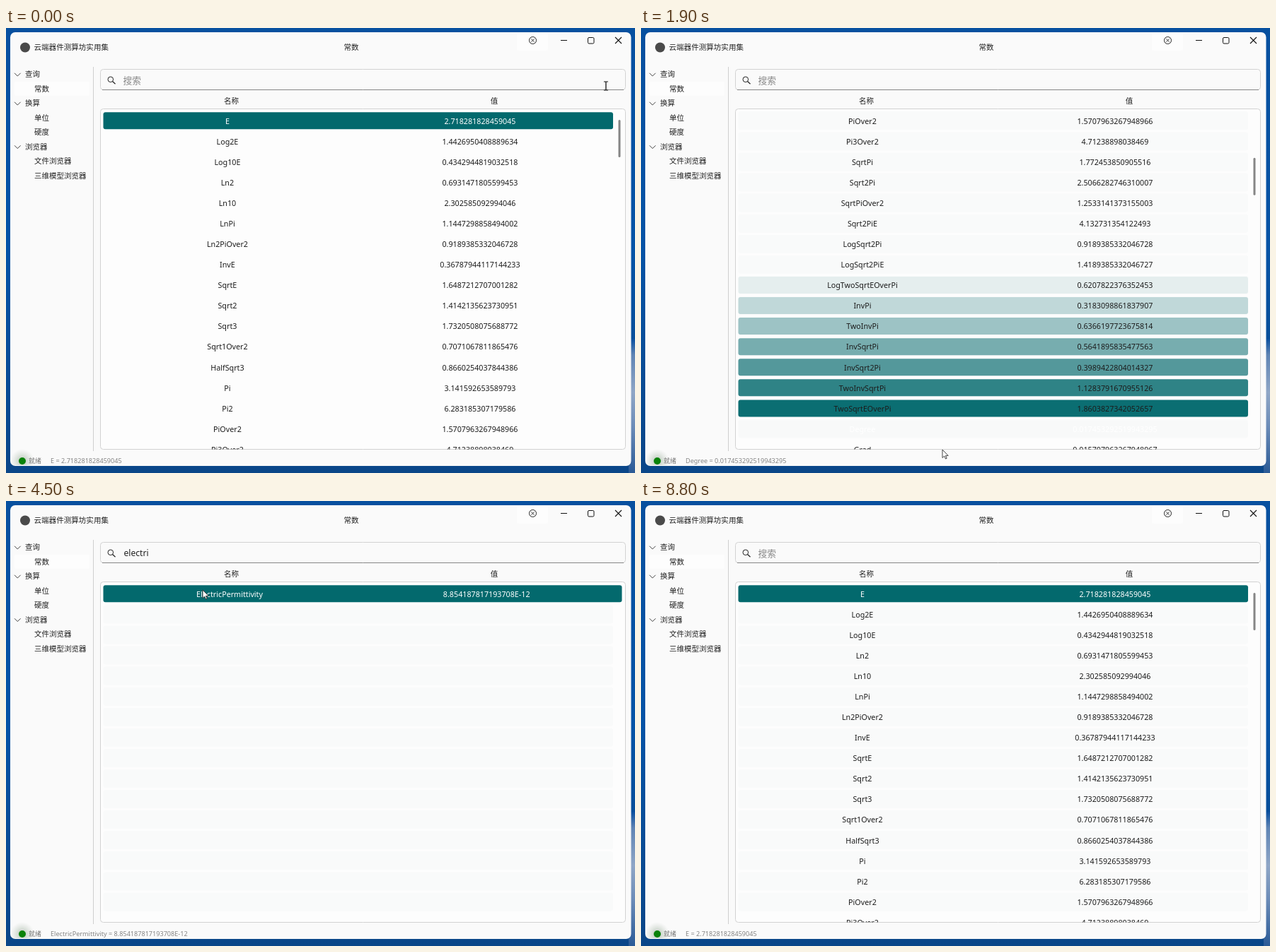
An HTML page with a canvas that plays this animation: 889x630 px, repeating every 8900 ms.

```html
<!DOCTYPE html>
<html lang="zh-CN">
<head>
<meta charset="utf-8">
<title>常数</title>
<style>
html, body { margin: 0; width: 889px; height: 630px; overflow: hidden; }
canvas { display: block; font-family: "Noto Sans", "Noto Sans CJK SC", sans-serif; }
</style>
</head>
<body>
<canvas id="stage" width="889" height="630"></canvas>
<script>
const LOOP = 8900, TEAL = '#03696d';
const FONT = '"Noto Sans", "Noto Sans CJK SC", "Noto Sans CJK", sans-serif';
const c = document.getElementById('stage').getContext('2d');

const constants = `E 2.718281828459045
Log2E 1.4426950408889634
Log10E 0.4342944819032518
Ln2 0.6931471805599453
Ln10 2.302585092994046
LnPi 1.1447298858494002
Ln2PiOver2 0.9189385332046728
InvE 0.36787944117144233
SqrtE 1.6487212707001282
Sqrt2 1.4142135623730951
Sqrt3 1.7320508075688772
Sqrt1Over2 0.7071067811865476
HalfSqrt3 0.8660254037844386
Pi 3.141592653589793
Pi2 6.283185307179586
PiOver2 1.5707963267948966
Pi3Over2 4.71238898038469
SqrtPi 1.772453850905516
Sqrt2Pi 2.5066282746310007
SqrtPiOver2 1.2533141373155003
Sqrt2PiE 4.132731354122493
LogSqrt2Pi 0.9189385332046728
LogSqrt2PiE 1.4189385332046727
LogTwoSqrtEOverPi 0.6207822376352453
InvPi 0.3183098861837907
TwoInvPi 0.6366197723675814
InvSqrtPi 0.5641895835477563
InvSqrt2Pi 0.3989422804014327
TwoInvSqrtPi 1.1283791670955126
TwoSqrtEOverPi 1.8603827342052657
Degree 0.017453292519943295
Grad 0.015707963267948967
PowerDecibel 0.11512925464970228
NeutralDecibel 0.23025850929940456
Catalan 0.915965594177219
EulerMascheroni 0.5772156649015329
GoldenRatio 1.618033988749895
Glaisher 1.2824271291006226
Khinchin 2.6854520010653062
SizeOfDouble 8
SizeOfInt 4
SpeedOfLight 299792458
MagneticPermeability 1.2566370614359173E-06
ElectricPermittivity 8.854187817193708E-12`.split('\n').map((line, id) => {
  const [name, value] = line.split(' ');
  return { id, name, value };
});
const LAST_ROW = 15, DRAG_END = 39, ELECTRIC = constants.length - 1;
const PICK = 4350, CLEAR = 6700, RESET = 7400;
const TYPE_START = 3700, KEY_GAP = 70;

// Pointer key points: time, x, y
const path = [
  [0, 848, 82], [100, 842, 82], [500, 500, 128], [680, 490, 140], [900, 472, 370],
  [1200, 442, 584], [1500, 442, 584], [1700, 426, 597], [2100, 426, 597],
  [2300, 294, 285], [2500, 266, 98], [2700, 242, 76], [4100, 242, 76],
  [4300, 278, 126], [4600, 278, 126], [5000, 420, 128], [5400, 584, 77],
  [6300, 858, 70], [6800, 858, 70], [7200, 780, 128], [7500, 770, 128],
  [8200, 872, 60], [8300, 882, 53], [8400, 900, 46]
];

function pointer(t) {
  const i = path.findIndex(p => p[0] > t);
  if (i < 0) return null;
  const [t0, x0, y0] = path[i - 1], [t1, x1, y1] = path[i];
  const u = (t - t0) / (t1 - t0);
  return [x0 + (x1 - x0) * u, y0 + (y1 - y0) * u];
}

// Moment at which the drag reaches an item
function reached(id) {
  if (id === 0) return -1000;
  return id <= LAST_ROW ? 880 + (id - 6) * 37 : 1520 + (id - LAST_ROW) * 25;
}

function selection(t) {
  if (t >= RESET) return { id: 0, since: RESET };
  if (t >= PICK) return { id: ELECTRIC, since: PICK };
  let id = 0;
  while (id < DRAG_END && reached(id + 1) <= t) id++;
  return { id, since: reached(id) };
}

function glow(id, sel, t) {
  if (id === sel.id) return Math.min(1, (t - sel.since) / 40) ** 3;
  return id < sel.id ? Math.max(0, 1 - (t - reached(id + 1)) / 170) : 0;
}

function text(str, x, y, size, color = '#222', align = 'left') {
  c.font = `${size}px ${FONT}`;
  c.fillStyle = color;
  c.textAlign = align;
  c.fillText(str, x, y + size * 0.37);
}

function box(x, y, w, h, r, fill, stroke) {
  c.beginPath();
  c.roundRect(x, y, w, h, r);
  if (fill) { c.fillStyle = fill; c.fill(); }
  if (stroke) { c.strokeStyle = stroke; c.lineWidth = 1; c.stroke(); }
}

function line(color, width, ...points) {
  c.beginPath();
  points.forEach(([x, y]) => c.lineTo(x, y));
  c.strokeStyle = color;
  c.lineWidth = width;
  c.stroke();
}

function circle(x, y, r, fill, stroke) {
  box(x - r, y - r, 2 * r, 2 * r, r, fill, stroke);
}

function cross(x, y, r, color, width = 1) {
  line(color, width, [x - r, y - r], [x + r, y + r]);
  line(color, width, [x - r, y + r], [x + r, y - r]);
}

function gradient(g, ...stops) {
  stops.forEach(([at, color]) => g.addColorStop(at, color));
  return g;
}

function drawDesktop() {
  c.fillStyle = gradient(c.createLinearGradient(0, 0, 0, 630),
    [0, '#07509f'], [0.5, '#0553a6'], [1, '#0a4688']);
  c.fillRect(0, 0, 889, 630);
  c.fillStyle = gradient(c.createLinearGradient(0, 440, 0, 630),
    [0, '#0a4f9f'], [0.12, '#5f84b4'], [0.4, '#8fa6c6'], [0.65, '#6c8cb8'], [1, '#2a5a96']);
  c.fillRect(880, 440, 9, 190);
}

function drawWindow() {
  box(6, 6, 877.5, 614, 7, '#fafafa');
  circle(27, 27.5, 7, '#4a4a4a');
  text('云端器件测算坊实用集', 39.5, 27.5, 10.55);
  text('常数', 488, 27.5, 10.55, '#222', 'center');

  box(722, 7, 44, 25, 3, '#fdfdfd');
  circle(744.5, 17.5, 5, null, '#222');
  cross(744.5, 17.5, 2, '#222');
  line('#111', 1, [784, 17.5], [793, 17.5]);
  box(822.5, 13.5, 8.5, 8.5, 1.5, null, '#111');
  cross(865.5, 17.5, 4.5, '#111', 1.1);

  box(12, 76, 106, 20, 3, '#fdfdfd');
  ['>查询', '常数', '>换算', '单位', '硬度', '>浏览器', '文件浏览器', '三维模型浏览器']
    .forEach((label, i) => {
      const y = 65.3 + i * 20.5, group = label[0] === '>';
      if (group) line('#444', 1, [12, y - 1.5], [16.3, y + 2.8], [20.6, y - 1.5]);
      text(label.replace('>', ''), group ? 27 : 40, y, 10.5);
    });
  line('#cfcfcf', 1, [123.5, 55], [123.5, 599]);
}

function drawStatus(item) {
  c.fillStyle = gradient(c.createRadialGradient(23, 613, 4, 23, 613, 17),
    [0, 'rgba(70,110,70,.28)'], [1, 'rgba(120,140,120,0)']);
  c.fillRect(6, 595, 36, 24);
  circle(23, 613, 5, '#0a820a');
  text('就绪', 32, 613, 9, '#777');
  text(`${item.name} = ${item.value}`, 63, 613, 9.1, '#858585');
}

function drawSearch(query, t, mouse) {
  const focused = t >= 2800 && t < PICK || t >= CLEAR && t < RESET;
  box(133.5, 58.5, 742, 29, 4, focused ? '#fefefe' : '#fafafa', '#d2d2d2');
  if (focused) line(TEAL, 2, [135, 87.5], [874, 87.5]);
  else line('#868686', 1, [136, 87.5], [873, 87.5]);
  circle(147.8, 72.8, 3.8, null, '#222');
  line('#222', 1.2, [150.5, 75.5], [154.5, 79.3]);

  if (query) text(query, 166.5, 73.8, 12.1);
  else text('搜索', 165.5, 74, 12.8, '#888');

  const caretOn = (t - (t < PICK ? 2850 : CLEAR)) % 1100 < 550;
  if (focused && caretOn) {
    c.font = `12.1px ${FONT}`;
    c.fillStyle = '#111';
    c.fillRect(Math.round(166.5 + c.measureText(query).width), 66, 1, 16);
  }
  if (query && (focused || overSearch(mouse))) cross(861.5, 74, 3.2, '#999');
}

function drawList(query, t, sel) {
  text('名称', 318.5, 103.3, 10.55, '#222', 'center');
  text('值', 690, 103.3, 10.55, '#222', 'center');
  box(133.5, 114.5, 742, 482, 4, '#fdfdfd', '#d2d2d2');

  const items = constants.filter(k => k.name.toLowerCase().includes(query));
  const scroll = query || t >= CLEAR ? 0 : Math.max(0, Math.min(sel.id, DRAG_END) - LAST_ROW);
  const hasBar = items.length > LAST_ROW + 1;
  const width = hasBar ? 720.5 : 733;

  c.save();
  c.beginPath();
  c.rect(134, 115, 741, 481.5);
  c.clip();
  for (let row = 0; row <= LAST_ROW + 1; row++) {
    const y = 119.3 + row * 29.08, item = items[row + scroll];
    // Rows already passed keep a faint tint
    if (row <= LAST_ROW && t > reached(row + 1)) box(137.5, y - 1, 720.5, 26, 3, '#f9fafa');
    if (!item) continue;
    const alpha = glow(item.id, sel, t);
    if (alpha > 0) {
      c.globalAlpha = alpha;
      box(137.5, y, width, 24, 3, TEAL);
      c.globalAlpha = 1;
    }
    const color = item.id === sel.id ? '#fff' : '#1c1c1c';
    text(item.name, 137.5 + width * 0.2435, y + 12.3, 10.72, color, 'center');
    text(item.value, 137.5 + width * 0.739, y + 12.3, 10.72, color, 'center');
  }
  c.restore();
  if (hasBar) box(865.5, 130 + scroll * 3.58, 3, 53, 1.5, '#868686');
}

function overSearch(mouse) {
  return mouse && mouse[0] > 133 && mouse[0] < 876 && mouse[1] > 58 && mouse[1] < 88;
}

function drawPointer(mouse, t) {
  if (!mouse || t >= TYPE_START && t < 4100) return;
  const [x, y] = mouse;
  if (overSearch(mouse)) {
    line('#111', 1.3, [x, y - 6], [x, y + 6]);
    line('#111', 1, [x - 3, y - 6], [x + 3, y - 6]);
    line('#111', 1, [x - 3, y + 6], [x + 3, y + 6]);
    return;
  }
  c.beginPath();
  [[0, 0], [0, 11.5], [2.7, 9], [4.5, 13], [6.2, 12.2], [4.5, 8.4], [8.2, 8.4]]
    .forEach(([dx, dy]) => c.lineTo(x + dx, y + dy));
  c.closePath();
  c.fillStyle = '#fff';
  c.strokeStyle = '#333';
  c.lineWidth = 0.9;
  c.fill();
  c.stroke();
}

function draw(now) {
  const t = now % LOOP;
  const sel = selection(t), mouse = pointer(t);
  const typed = Math.max(0, Math.floor((t - TYPE_START) / KEY_GAP) + 1);
  const query = t < CLEAR ? 'electri'.slice(0, typed) : '';
  drawDesktop();
  drawWindow();
  drawStatus(constants[sel.id]);
  drawSearch(query, t, mouse);
  drawList(query, t, sel);
  drawPointer(mouse, t);
}

const start = performance.now();
function tick() {
  draw(performance.now() - start);
  requestAnimationFrame(tick);
}
tick();
</script>
</body>
</html>
```
